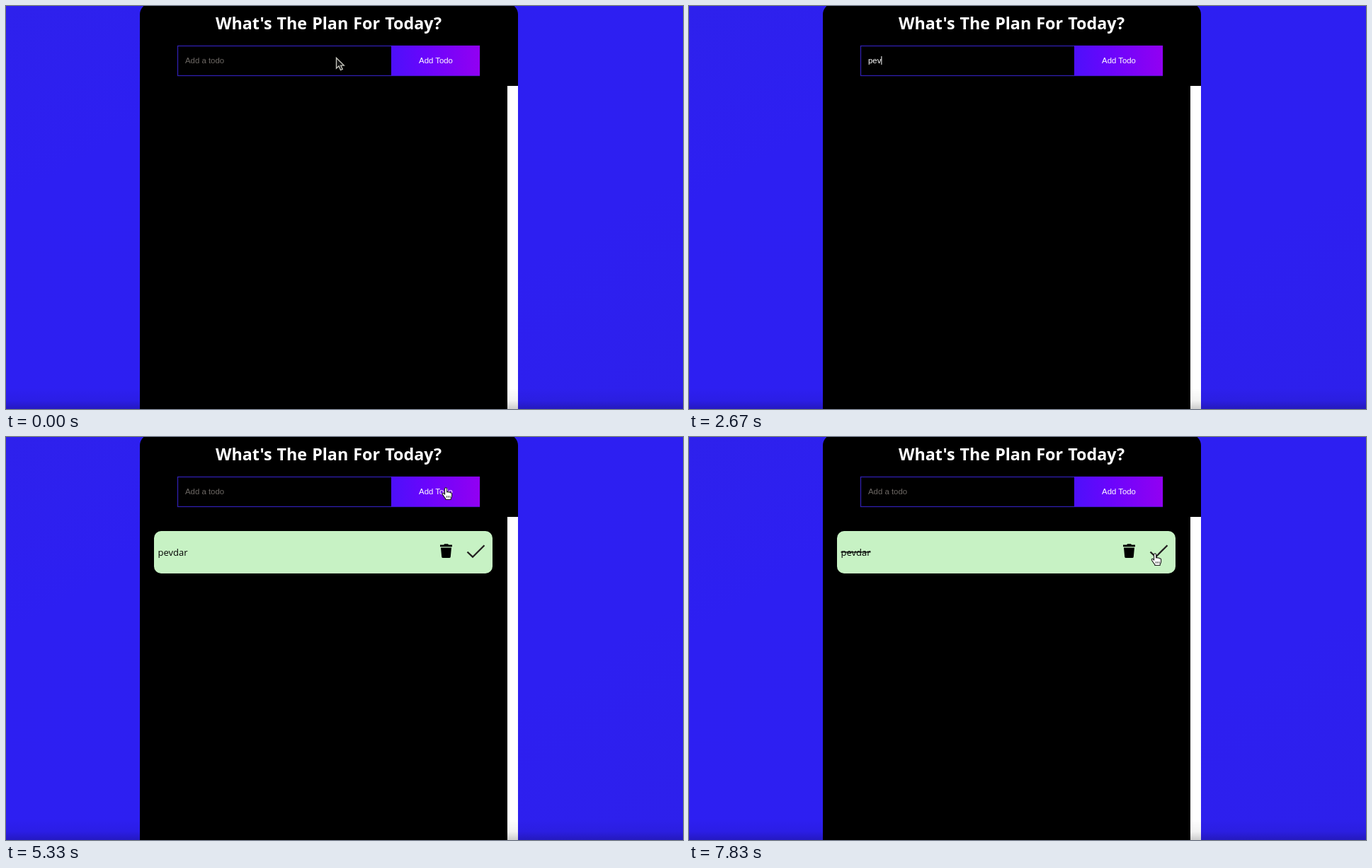
An HTML page for the animation above (8 s loop, 956x570 px).

```html
<!DOCTYPE html>
<html lang="en">
<head>
<meta charset="utf-8">
<title>Todo list</title>
<style>
  html, body { margin: 0; width: 100%; height: 100%; overflow: hidden; background: #2d1ff1; }
  svg { display: block; width: 956px; height: 570px; }
  .ui { font: 11.4px "Liberation Sans", Arial, sans-serif; fill: #fff; }
  .hint { fill: #6e6965; }
  .title { font: bold 23.3px "Trebuchet MS", "Open Sans", sans-serif; word-spacing: 1px; fill: #fff; }
  .label { font: 13px "Trebuchet MS", "Open Sans", sans-serif; fill: #000; }
  .done { text-decoration: line-through; }
  [hidden] { display: none; }
</style>
</head>
<body>
<svg viewBox="0 0 956 570">
  <defs>
    <linearGradient id="page" x2="1" y2="1">
      <stop stop-color="#2e21ec"/>
      <stop offset=".25" stop-color="#2d1ff2"/>
      <stop offset=".7" stop-color="#2d1ff1"/>
      <stop offset="1" stop-color="#2d20eb"/>
    </linearGradient>
    <linearGradient id="action">
      <stop stop-color="#4d10fa"/>
      <stop offset=".4" stop-color="#6a05fc"/>
      <stop offset="1" stop-color="#9200f2"/>
    </linearGradient>
    <linearGradient id="shade" x2="0" y2="1">
      <stop stop-color="#000" stop-opacity="0"/>
      <stop offset=".6" stop-color="#000" stop-opacity=".05"/>
      <stop offset="1" stop-color="#000" stop-opacity=".2"/>
    </linearGradient>
  </defs>

  <rect width="956" height="570" fill="url(#page)"/>
  <rect x="189" y="-4" width="534" height="600" rx="16"/>
  <rect x="708" y="113" width="15" height="457" fill="#fff"/>
  <text class="title" x="455.5" y="33" text-anchor="middle">What's The Plan For Today?</text>

  <rect x="242.5" y="56.5" width="426" height="42" fill="#000" stroke="#2f1fae" stroke-width="1.3"/>
  <rect x="544" y="56" width="125" height="42.5" fill="url(#action)"/>
  <text class="ui" x="607" y="81" text-anchor="middle">Add Todo</text>
  <text class="ui hint" id="hint" x="253" y="81">Add a todo</text>
  <text class="ui" id="typed" x="253" y="81"></text>
  <path id="spelling" d="M253 83H287" stroke="#a02020" stroke-dasharray="1.5 1.5" opacity=".6"/>
  <rect id="caret" y="71" width="1" height="12" fill="#fff"/>

  <g id="item">
    <rect x="209" y="133" width="478" height="60" rx="10" fill="#c7f2c4"/>
    <text class="label" id="label" x="214.5" y="167.5">pevdar</text>
    <path d="M613 152.5h5l1.2-1.3h4.8l1.2 1.3h4.8v2.8h-17zM614 156.5h15l-1.2 13q-.2 1.6-1.8 1.6h-9q-1.6 0-1.8-1.6z"/>
    <path d="M651.5 162.5l7.5 7.2 16.5-16.5" fill="none" stroke="#231f20" stroke-width="2.3"/>
  </g>

  <rect y="540" width="956" height="30" fill="url(#shade)"/>

  <g id="pointer">
    <path id="arrow" d="M.5.5v14.7l3.5-3.2 2.5 5.6 2.7-1.2-2.5-5.3h4.5z" fill="#111" stroke="#c4c4bc" stroke-width="1.4"/>
    <g id="beam" fill="none">
      <path id="stem" d="M-4-8q4 0 4 3V5q0 3-4 3M4-8q-4 0-4 3V5q0 3 4 3M-2.5 2h5" stroke="#77776f" stroke-width="3"/>
      <path d="M-4-8q4 0 4 3V5q0 3-4 3M4-8q-4 0-4 3V5q0 3 4 3M-2.5 2h5" stroke="#000" stroke-width="1.2"/>
    </g>
    <g id="hand" stroke="#1c1c1c" stroke-width="1.1" stroke-linejoin="round">
      <path d="M-3.4 1.2V-6.6q0-1.6 1.5-1.6t1.5 1.6V-2q2-1.3 2.6.3 1.9-.8 2.4.7 2-.5 2 1.6v3q0 1.5-1.4 3.2V8.5h-7.4V7.2q-1.5-1.2-2.8-3.6L-6.6 1q-.4-1.6 1-1.7 1.2 0 2.2 1.9z" fill="#fff"/>
      <path d="M-.6 3.2v2.6M1.7 3.2v2.6M4 3.2v2.6" stroke-width=".9"/>
    </g>
  </g>
</svg>

<script>
const LOOP = 8000, STEP = 1000 / 6;
const WORD = "pevdar";
const KEY_STEPS = [9, 12, 15, 19, 22, 25];
const FOCUS = 4, ADD = 31, CHECK = 43;

// step, x, y, pointer shape from that step on
const PATH = [
  [0, 466, 73, "arrow"], [1, 470, 81, "beam"], [8, 470, 81, "none"],
  [27, 516, 74, "beam"], [28, 521, 72, "beam"], [29, 572, 76, "hand"],
  [30, 619, 79, "hand"], [32, 623, 80, "hand"], [35, 623, 80, "hand"],
  [38, 654, 172, "hand"], [40, 655, 174, "hand"], [43, 660, 173, "hand"],
  [48, 660, 173, "hand"]
];

const get = id => document.getElementById(id);
const show = (id, on) => get(id).toggleAttribute("hidden", !on);

function drawPointer(step) {
  const i = PATH.findIndex((p, k) => k + 1 === PATH.length - 1 || step < PATH[k + 1][0]);
  const [start, x0, y0, shape] = PATH[i], [end, x1, y1] = PATH[i + 1];
  const u = (step - start) / (end - start), k = u * u * (3 - 2 * u);
  const x = x0 + (x1 - x0) * k, y = y0 + (y1 - y0) * k;
  get("pointer").setAttribute("transform", `translate(${x} ${y})`);
  for (const name of ["arrow", "beam", "hand"]) show(name, name === shape);
}

function draw(time) {
  const step = Math.floor((time % LOOP + 4) / STEP) % 48;
  const added = step >= ADD;
  const count = added ? 0 : KEY_STEPS.filter(s => step >= s).length;
  const typed = get("typed");
  typed.textContent = WORD.slice(0, count);
  show("hint", count === 0);
  show("spelling", !added && step > 25);
  show("caret", step >= FOCUS && !added);
  get("caret").setAttribute("x", 253 + (count ? typed.getComputedTextLength() : 0));
  show("item", added);
  get("label").classList.toggle("done", step >= CHECK);
  drawPointer(step);
}

const begin = performance.now();
function tick() {
  draw(performance.now() - begin);
  requestAnimationFrame(tick);
}
tick();
</script>
</body>
</html>
```
